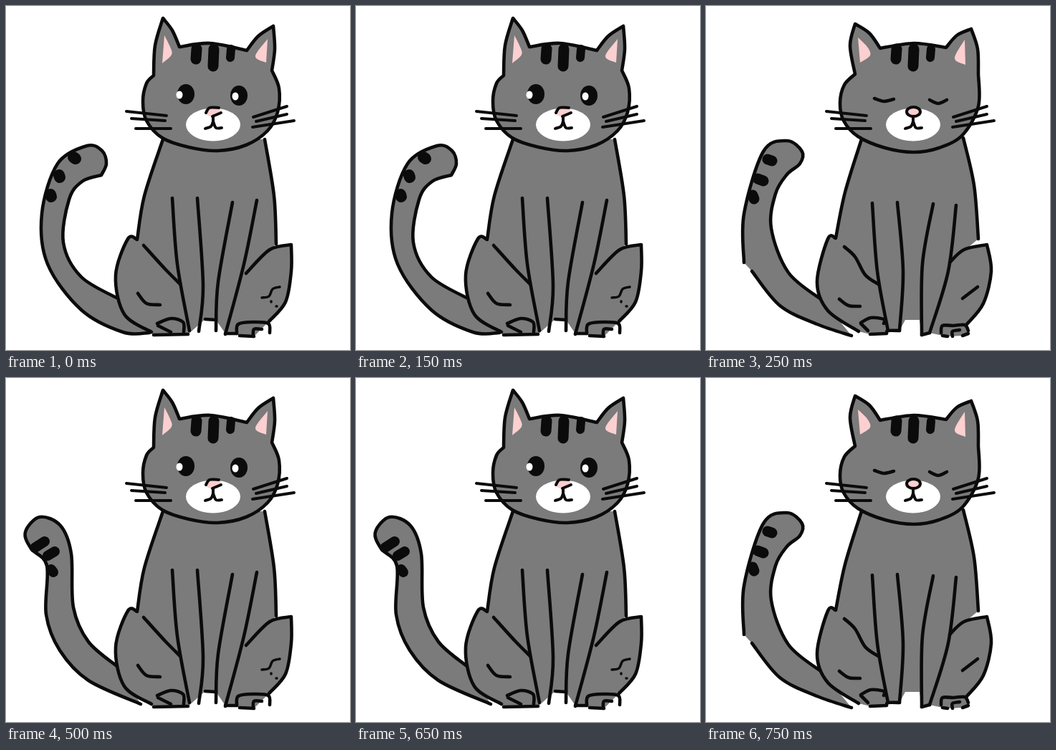
Recreate the animation shown at these times as an HTML page with a canvas. Size 480 by 480 pixels, loop 1000 ms.

```html
<!DOCTYPE html>
<html lang="en">
<head>
<meta charset="utf-8">
<title>Sitting cat</title>
<style>
  html, body { margin: 0; width: 100%; height: 100%; overflow: hidden; background: #fff; }
  canvas { display: block; width: 100vw; height: 100vh; }
</style>
</head>
<body>
<canvas width="480" height="480"></canvas>
<script>
const ctx = document.querySelector("canvas").getContext("2d");
const INK = "#0b0b0b", FUR = "#7b7b7b", PINK = "#fccfd0", WHITE = "#fff";

// Smooth curve through points; "/" makes a corner, "|" lifts the pen.
function trace(text, joined) {
  const path = new Path2D();
  text.split("|").forEach((part, index) => {
    let last = null;
    for (const piece of part.split("/")) {
      const n = piece.trim().split(/\s+/).map(Number);
      const pts = last ? [last] : [];
      for (let i = 0; i < n.length; i += 2) pts.push([n[i], n[i + 1]]);
      if (!last) path[joined && index ? "lineTo" : "moveTo"](...pts[0]);
      for (let i = 1; i < pts.length; i++) {
        const a = pts[i - 1], b = pts[i];
        const before = pts[i - 2] || a, after = pts[i + 1] || b;
        path.bezierCurveTo(
          a[0] + (b[0] - before[0]) / 6, a[1] + (b[1] - before[1]) / 6,
          b[0] - (after[0] - a[0]) / 6, b[1] - (after[1] - a[1]) / 6, ...b);
      }
      last = pts.at(-1);
    }
  });
  return path;
}

function line(text, width = 4.6) {
  ctx.lineWidth = width;
  ctx.stroke(trace(text));
}

function fill(text, color) {
  ctx.fillStyle = color;
  ctx.fill(trace(text, true));
}

function furry(text) {
  fill(text, FUR);
  line(text);
}

function oval(x, y, rx, ry, color) {
  ctx.beginPath();
  ctx.ellipse(x, y, rx, ry, 0, 0, 2 * Math.PI);
  ctx.fillStyle = color;
  ctx.fill();
}

const tails = {
  up() {
    furry("158 409 105 378 80 330 88 270 106 245 133 236 / 140 220 134 202 113 195 72 220 50 290 58 360 105 424 163 455 200 456");
    line("94 211 97 213 | 74 236 75 239 | 62 263 63 266", 16);
  },
  mid() {
    furry("163 411 115 372 91 310 97 262 113 235 131 220 134 203 113 188 80 203 53 290 53 358 | 64 370 103 418 155 444 203 460");
    line("86 214 92 216 | 72 241 80 244 | 65 264 67 269", 15);
  },
  out() {
    furry("156 403 115 368 94 320 91 245 76 206 47 194 27 215 35 238 57 262 56 330 75 380 115 422 188 455");
    line("40 237 54 228 | 58 248 68 242 | 63 267 66 271", 14);
  }
};

function muzzle() {
  line("266 60 265 74 | 290 60 289 84", 15);
  line("314 60 313 72", 12);
  oval(289, 165.5, 38, 23, WHITE);
  line("168 147 224 153 | 175 157 222 160 | 181 171 230 171", 4);
  line("345 155 392 140 | 349 161 392 151 | 344 169 402 160", 4);
  line("289 154 289 161 / 286 168 278 171 | 289 161 293 170 301 170", 4);
}

function awake() {
  furry("219 186 193 265 183 326 / 170 325 153 376 165 430 203 455 | 206 459 254 458 | 278 437 293 438 | 306 457 322 457 | 326 460 346 461 | 367 440 390 413 398 370 398 333 / 368 340 335 373 | 377 332 374 265 361 186");
  line("232 268 239 360 256 453 | 267 268 275 390 269 454 | 316 274 296 385 293 453 | 350 271 332 360 306 458");
  line("192 334 222 367 243 388 | 184 401 196 415 215 417");
  line("357 407 367 405 372 395 382 392 | 370 412 370 413 | 377 419 378 419", 3.5);
  line("211 443 230 436 247 441 248 455 | 212 446 230 455 | 322 457 324 444 345 441 366 443 368 456 | 345 461 346 451 357 451");
  furry("206 97 208 55 219 17 / 232 34 242 57 / 285 52 336 62 / 352 42 373 28 / 375 60 371 90 / 381 115 379 148 365 174 335 194 295 202 255 197 218 184 196 160 191 133 196 108 206 97");
  fill("221 41 229 57 231 68 218 80", PINK);
  fill("365 46 348 70 363 79", PINK);
  muzzle();
  for (const [x, y, gleam] of [[251, 123, 242], [325, 125, 320]]) {
    oval(x, y, 12, 14, INK);
    oval(gleam, y + 1, 4.5, 5.5, WHITE);
  }
  oval(289, 147.5, 11, 7, PINK);
  line("279 149 284 142 297 142 | 300 149 288 154", 4);
}

function asleep() {
  furry("217 186 194 260 181 324 / 170 325 155 385 170 425 213 454 | 229 458 252 457 / 254 453 270 453 | 278 438 | 298 438 | 301 459 312 456 | 330 460 337 461 | 358 460 366 457 | 364 444 387 415 398 370 392 333 / 360 340 340 358 | 380 325 374 250 359 184");
  line("232 275 239 370 254 453 | 267 274 275 370 270 453 | 317 276 302 360 301 459 | 349 278 338 370 312 456");
  line("193 336 208 350 222 375 240 388 | 186 409 199 418 215 419 | 358 408 379 392");
  line("216 442 230 435 248 437 248 443 | 216 443 226 453 | 328 456 330 446 345 446 361 445 366 453 | 344 461 344 454 354 452");
  furry("208 95 201 55 208 25 / 228 38 243 59 / 290 52 335 58 / 350 41 370 32 / 379 60 380 95 / 380 140 358 180 325 198 290 204 250 198 212 182 192 160 187 135 193 110 208 95");
  fill("212 44 225 57 229 69 215 79", PINK);
  fill("361 47 347 73 362 82", PINK);
  muzzle();
  line("235 129 248 133 262 130 | 312 131 324 136 336 131");
  oval(289.5, 147.5, 9.5, 6.5, PINK);
  ctx.lineWidth = 4;
  ctx.stroke();
}

const poses = [[tails.up, awake], [tails.mid, asleep], [tails.out, awake], [tails.mid, asleep]];
const start = performance.now();
ctx.lineCap = ctx.lineJoin = "round";
ctx.strokeStyle = INK;

function draw() {
  const time = (performance.now() - start) % 1000;
  ctx.clearRect(0, 0, 480, 480);
  for (const part of poses[Math.floor(time / 250)]) part();
  requestAnimationFrame(draw);
}
draw();
</script>
</body>
</html>
```
